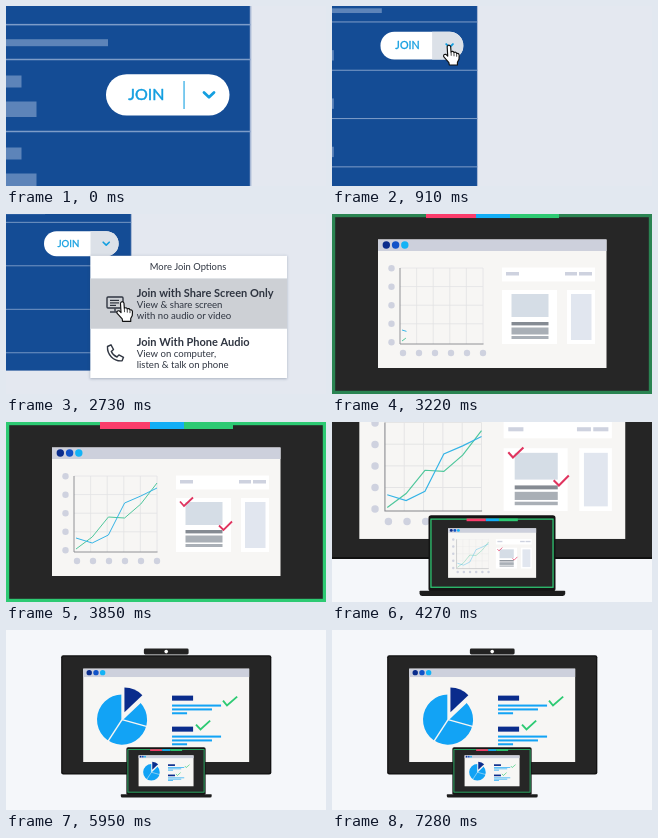
Animation, 320 px wide and 180 px high, one loop 7.35 s. Source, as an HTML page with a canvas:

```html
<!DOCTYPE html>
<html lang="en">
<head>
<meta charset="utf-8">
<title>Join options</title>
<style>
html, body { margin: 0; width: 100%; height: 100%; overflow: hidden; background: #e3e8f1; }
canvas { display: block; width: 100vw; height: 100vh; }
</style>
</head>
<body>
<canvas id="stage"></canvas>
<script>
const LOOP = 7350, STEP = 70;
const canvas = document.getElementById('stage');
const ctx = canvas.getContext('2d');
const SKY = '#12a3f5', NAVY = '#0a2c8c', GREEN = '#2dca73', PINK = '#e0345f', INK = '#2f3541';

const clamp = v => Math.max(0, Math.min(1, v));
const prog = (t, a, b) => clamp((t - a) / (b - a));
const lerp = (a, b, u) => a + (b - a) * u;
const easeOut = u => 1 - Math.pow(1 - u, 3);
const easeInOut = u => u < 0.5 ? 4 * u * u * u : 1 - 4 * Math.pow(1 - u, 3);
const easeBack = u => 1 + 2.7 * Math.pow(u - 1, 3) + 1.7 * Math.pow(u - 1, 2);

function rect(x, y, w, h, color) {
  ctx.fillStyle = color;
  ctx.fillRect(x, y, w, h);
}
function round(x, y, w, h, r, color) {
  ctx.beginPath();
  ctx.roundRect(x, y, w, h, r);
  ctx.fillStyle = color;
  ctx.fill();
}
function dot(x, y, r, color) {
  ctx.beginPath();
  ctx.arc(x, y, r, 0, Math.PI * 2);
  ctx.fillStyle = color;
  ctx.fill();
}
function text(str, x, y, font, color, align = 'left') {
  ctx.font = font + ' Lato, "Open Sans", sans-serif';
  ctx.textAlign = align;
  ctx.fillStyle = color;
  ctx.fillText(str, x, y);
}
// Polyline drawn up to the fraction u of its length
function line(pts, color, width, u = 1) {
  if (u <= 0) return;
  const lens = pts.slice(1).map((p, i) => Math.hypot(p[0] - pts[i][0], p[1] - pts[i][1]));
  let left = u * lens.reduce((a, b) => a + b, 0);
  ctx.beginPath();
  ctx.moveTo(...pts[0]);
  for (let i = 0; i < lens.length && left > 0; i++) {
    const f = Math.min(1, left / lens[i]);
    ctx.lineTo(lerp(pts[i][0], pts[i + 1][0], f), lerp(pts[i][1], pts[i + 1][1], f));
    left -= lens[i];
  }
  ctx.strokeStyle = color;
  ctx.lineWidth = width;
  ctx.stroke();
}
function group(draw, alpha = 1) {
  if (alpha <= 0) return;
  ctx.save();
  ctx.globalAlpha *= alpha;
  draw();
  ctx.restore();
}

// ---- Join menu ----
function camera(t) {
  const u = easeInOut(prog(t, 180, 1300));
  return { s: lerp(1, 0.604, u), x: lerp(0, -22.4, u), y: lerp(0, -24, u) };
}

function drawPanel() {
  const edge = 244.4, bottom = 299;
  rect(0, -40, edge, bottom + 40, '#144c95');
  rect(edge - 0.6, -40, 1.6, bottom + 40, '#a9b9d5');
  rect(0, 17.9, edge, 1.5, '#7d9cc8');
  rect(0, 33.2, 102, 7, '#5d84b9');
  for (let y = 53.5; y < bottom; y += 72) {
    rect(0, y - 0.75, edge, 1.5, '#7d9cc8');
    if (y > 200) continue;
    rect(0, y + 16, 15.5, 12, '#5d84b9');
    rect(0, y + 42, 30.5, 15.5, '#5d84b9');
  }
}

function drawButton(hover) {
  round(100, 68.2, 123.5, 41.3, 20.6, '#fff');
  if (hover) round(177, 68.2, 46.5, 41.3, [0, 20.6, 20.6, 0], '#dce1e8');
  else rect(177.4, 75, 1.3, 28, '#3bb0e6');
  text('JOIN', 140.3, 93.6, '16px', '#149fe0', 'center');
  ctx.lineCap = 'round';
  ctx.lineJoin = 'round';
  ctx.lineWidth = 0.45;
  ctx.strokeStyle = '#149fe0';
  ctx.strokeText('JOIN', 140.3, 93.6);
  line([[198, 86.5], [203, 91.2], [208, 86.5]], '#149fe0', 2.8);
}

function drawScreenIcon() {
  ctx.lineJoin = 'round';
  ctx.strokeStyle = INK;
  ctx.lineWidth = 1.4;
  ctx.beginPath();
  ctx.roundRect(101, 83, 16, 11, 1);
  ctx.stroke();
  rect(104, 85.8, 9, 1.2, INK);
  rect(104, 88.3, 9, 1.2, INK);
  rect(104, 90.8, 6, 1.2, INK);
  rect(108.3, 94.5, 1.4, 3, INK);
  rect(104, 97.3, 10, 1.4, INK);
}

function drawPhoneIcon() {
  ctx.beginPath();
  ctx.moveTo(101.5, 132.5);
  ctx.lineTo(105, 130.8);
  ctx.lineTo(107.5, 135.5);
  ctx.lineTo(105.3, 137.5);
  ctx.quadraticCurveTo(107, 141.5, 111, 143);
  ctx.lineTo(112.9, 140.9);
  ctx.lineTo(117.5, 143.3);
  ctx.lineTo(116.1, 146.8);
  ctx.bezierCurveTo(107.5, 147.5, 101, 140.5, 101.5, 132.5);
  ctx.closePath();
  ctx.lineJoin = 'round';
  ctx.strokeStyle = INK;
  ctx.lineWidth = 1.4;
  ctx.stroke();
}

function drawMenu(size, hover) {
  ctx.save();
  ctx.translate(100, 42);
  ctx.scale(size, size);
  ctx.translate(-100, -42);
  ctx.save();
  ctx.shadowColor = 'rgba(40,55,85,.3)';
  ctx.shadowBlur = 2.5 * canvas.width / 320;
  ctx.shadowOffsetY = 0.6 * canvas.width / 320;
  rect(84.3, 41.8, 196.7, 122.2, '#fff');
  ctx.restore();
  text('More Join Options', 182, 56, '9.4px', INK, 'center');
  rect(84.3, 64.4, 196.7, 0.8, '#d5d9df');
  if (hover > 0) group(() => rect(84.3, 64.8, 196.7, 49.5, '#cdd0d5'), hover);
  rect(84.3, 114, 196.7, 0.8, '#d5d9df');
  drawScreenIcon();
  drawPhoneIcon();
  [['Join with Share Screen Only', 'View & share screen', 'with no audio or video'],
   ['Join With Phone Audio', 'View on computer,', 'listen & talk on phone']].forEach((item, i) => {
    const y = 82.7 + i * 49.3;
    text(item[0], 130.7, y, 'bold 11px', INK);
    text(item[1], 130.7, y + 11.3, '9.6px', INK);
    text(item[2], 130.7, y + 22, '9.6px', INK);
  });
  ctx.restore();
}

function drawHand(x, y, size) {
  ctx.save();
  ctx.translate(x, y);
  ctx.scale(size, size);
  ctx.beginPath();
  ctx.moveTo(-1.8, 1.5);
  ctx.quadraticCurveTo(0, -1.4, 1.8, 1.5);
  ctx.lineTo(2.2, 7);
  ctx.quadraticCurveTo(4.2, 5.6, 5.2, 7.6);
  ctx.quadraticCurveTo(7.2, 6.6, 8, 8.6);
  ctx.quadraticCurveTo(10, 8, 10.6, 10.4);
  ctx.lineTo(10.4, 14.5);
  ctx.lineTo(8.8, 17.6);
  ctx.lineTo(8.8, 20.5);
  ctx.lineTo(0.4, 20.5);
  ctx.lineTo(0, 18);
  ctx.lineTo(-5.4, 12);
  ctx.quadraticCurveTo(-5.8, 9, -3, 9.6);
  ctx.lineTo(-1.2, 11.4);
  ctx.closePath();
  ctx.fillStyle = '#fff';
  ctx.strokeStyle = '#111';
  ctx.lineWidth = 1.2;
  ctx.lineJoin = 'round';
  ctx.fill();
  ctx.stroke();
  line([[2.2, 7], [2.4, 11]], '#111', 0.8);
  line([[5.2, 8], [5.3, 11.5]], '#111', 0.8);
  line([[8, 9], [8, 12]], '#111', 0.8);
  ctx.restore();
}

function drawJoin(t) {
  const cam = camera(t);
  rect(0, 0, 320, 180, '#e4e8f0');
  group(() => {
    ctx.translate(cam.x, cam.y);
    ctx.scale(cam.s, cam.s);
    drawPanel();
    drawButton(t >= 770);
  });
  const open = prog(t, 1610, 2030);
  group(() => drawMenu(easeBack(open), prog(t, 2240, 2380)), clamp(open * 3));

  const chev = { x: 202 * cam.s + cam.x, y: 88 * cam.s + cam.y };
  const enter = easeInOut(prog(t, 140, 840));
  const move = easeInOut(prog(t, 2030, 2520));
  const x = lerp(lerp(240, chev.x, enter), 116.2, move);
  const y = lerp(lerp(192, chev.y, enter), 87.5, move);
  const click = Math.sin(Math.PI * prog(t, 1400, 1610)) + Math.sin(Math.PI * prog(t, 2750, 2950));
  drawHand(x, y, 0.97 - 0.12 * click);
}

// ---- Shared screen ----
function drawChart(t) {
  const u = easeInOut(prog(t, 3080, 3710));
  ctx.lineCap = 'butt';
  for (let i = 1; i < 6; i++) {
    const x = 68 + i * 16.6, y = 54 + (i - 1) * 18.6;
    line([[x, 54], [x, 130]], '#e3e3e5', 0.8);
    if (i < 5) line([[68, y], [151, y]], '#e3e3e5', 0.8);
  }
  line([[68, 54], [68, 130], [151.5, 130]], '#85878c', 0.9);
  for (let i = 0; i < 6; i++) {
    if (i < 5) dot(59.5, 54.3 + i * 18.5, 3.2, '#cfd2df');
    dot(71 + i * 16, 139, 3.2, '#cfd2df');
  }
  const series = ys => ys.map((y, i) => [70 + i * 16.2, y]);
  line(series([127, 115, 95, 96, 82, 61]), '#4fc79c', 1, u);
  line(series([116, 121, 113, 81, 74, 66]), '#36b4e6', 1, u);

  rect(170, 53.5, 93, 14, '#fff');
  [[174, 13], [233, 12], [247, 13]].forEach(b => rect(b[0], 58, b[1], 3.5, '#ced2df'));
  rect(170, 76, 55, 54, '#fff');
  rect(179.5, 80, 37, 23, '#d5dde6');
  rect(179.5, 108, 37, 3.4, '#858b93');
  rect(179.5, 113.5, 37, 7, '#a9afb6');
  rect(179.5, 122, 37, 3, '#a9afb6');
  rect(235, 76, 28, 54, '#fff');
  rect(239, 80, 20.5, 46, '#e1e6ef');
  line([[174, 79.5], [178, 84], [187, 75.5]], PINK, 1.8, prog(t, 3360, 3570));
  line([[213, 103.5], [217.5, 108], [226, 99.5]], PINK, 1.8, prog(t, 3570, 3780));
}

function drawPie(t) {
  const grow = easeOut(prog(t, 5320, 5600));
  const slice = (x, y, r, a, b, color) => {
    ctx.beginPath();
    ctx.moveTo(x, y);
    ctx.arc(x, y, r, a, b);
    ctx.closePath();
    ctx.fillStyle = color;
    ctx.fill();
  };
  const up = -Math.PI / 2, cut = -0.76;
  slice(99.5, 95.7, 34.5 * grow, cut, up + Math.PI * 2, SKY);
  [0.27, 2.15, cut, up].forEach(a =>
    line([[99.5, 95.7], [99.5 + 36 * Math.cos(a), 95.7 + 36 * Math.sin(a)]], '#f7f6f4', 2));
  slice(102.8, 85.5, 34 * grow, up, cut, NAVY);

  [62.6, 105.3].forEach((y, i) => {
    const w = easeOut(prog(t, 5320 + i * 70, 5670 + i * 70));
    rect(168.3, y, 29 * w, 6.9, NAVY);
    [67.5, 55, 20.7].forEach((len, j) => rect(168.3, y + 12.3 + j * 5.3, len * w, 2.8, SKY));
  });
  line([[238.5, 69.5], [244, 76.2], [258, 64]], GREEN, 2.6, prog(t, 5600, 5740));
  line([[201.3, 102.5], [207.5, 109.2], [220.8, 97]], GREEN, 2.6, prog(t, 5740, 5880));
}

function drawWindow(t) {
  const swap = prog(t, 5250, 5460);
  rect(46, 25.5, 228.5, 128.5, '#f7f6f4');
  rect(46, 25.5, 228.5, 11.5, '#cdd0dc');
  dot(54.3, 31, 3.7, NAVY);
  dot(63.6, 31, 3.7, '#1253c8');
  dot(72.8, 31, 3.7, '#13b3f6');
  ctx.lineCap = 'butt';
  ctx.lineJoin = 'miter';
  group(() => drawChart(t), 1 - swap);
  group(() => drawPie(t), swap);
}

function drawDesktop(t) {
  const tab = easeOut(prog(t, 3150, 3430));
  rect(0, 0, 320, 180, '#262626');
  group(() => {
    ctx.strokeStyle = GREEN;
    ctx.lineWidth = 3.2;
    ctx.strokeRect(1.6, 1.6, 316.8, 176.8);
  }, tab);
  const y = -7 + 7 * tab;
  rect(94, y, 50, 7, '#fb3c6b');
  rect(144, y, 34, 7, '#12aef6');
  rect(178, y, 49, 7, GREEN);
  drawWindow(t);
}

function drawDevices(t) {
  const u = 1 - Math.pow(1 - prog(t, 3870, 5400), 3.65);
  const k = 4 * Math.pow(0.2405, u);
  rect(0, 0, 320, 180, '#f5f7fa');
  ctx.save();
  ctx.translate(160, 157);
  ctx.scale(k, k);
  ctx.translate(-160, -157);

  round(137, 13, 46.5, 6.3, 1.5, '#222');
  dot(160.2, 16.2, 1.9, '#fff');
  round(51, 20, 218.5, 124, 2.2, '#111');
  round(52.3, 21.3, 215.9, 121.4, 1.5, '#252525');
  group(() => {
    ctx.translate(160, 34);
    ctx.scale(0.755, 0.755);
    ctx.translate(-160, -25.5);
    drawWindow(t);
  });

  round(118.8, 115.7, 82.4, 49.5, 1.8, '#141414');
  group(() => {
    ctx.translate(120, 117.75);
    ctx.scale(0.25, 0.25);
    drawDesktop(t);
  });
  round(113, 164.6, 94.5, 3.4, [0.5, 0.5, 1.6, 1.6], '#1c1c1c');
  ctx.restore();
}

function resize() {
  const dpr = window.devicePixelRatio || 1;
  canvas.width = Math.round(innerWidth * dpr);
  canvas.height = Math.round(innerHeight * dpr);
}

function frame() {
  const t = Math.floor((performance.now() % LOOP) / STEP) * STEP;
  ctx.setTransform(canvas.width / 320, 0, 0, canvas.height / 180, 0, 0);
  const fade = prog(t, 2940, 3150);
  if (fade < 1) drawJoin(t);
  group(() => drawDevices(t), fade);
  requestAnimationFrame(frame);
}

addEventListener('resize', resize);
resize();
frame();
</script>
</body>
</html>
```
